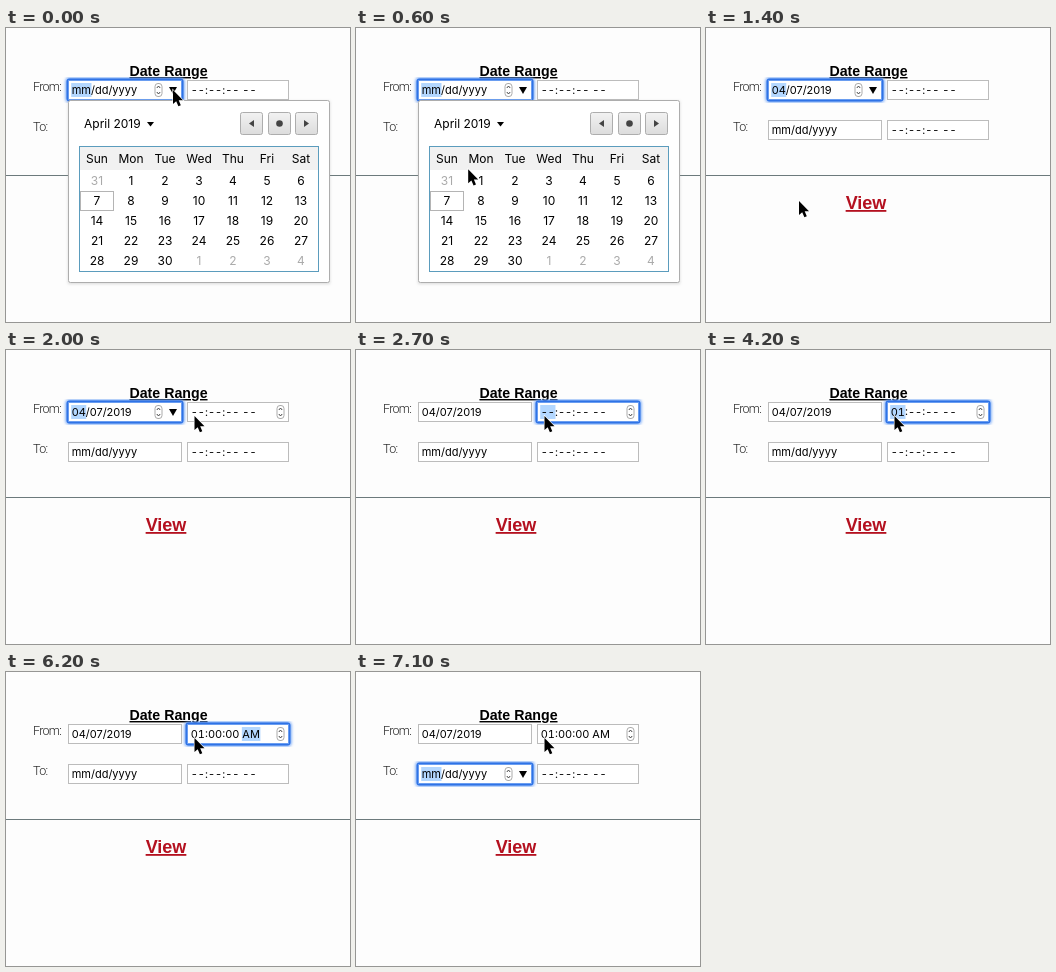
Recreate the animation shown at these times as an HTML page. Size 344x294 px, loop 8000 ms.

```html
<!DOCTYPE html>
<html lang="en">
<head>
<meta charset="utf-8">
<style>
html, body { margin: 0; width: 100%; height: 100%; overflow: hidden; background: #fdfdfd; }
svg { display: block; }
text { font: 11px Inter, "Liberation Sans", sans-serif; fill: #000; }
.title { font: bold 14.2px "Liberation Sans", Arial, sans-serif; text-decoration: underline; text-anchor: middle; }
.view { font: bold 18px "Liberation Sans", Arial, sans-serif; fill: #b4101f; text-decoration: underline; text-anchor: middle; }
.label { font: 300 12.5px Roboto, sans-serif; letter-spacing: -.7px; fill: #222; }
.time { font-variant-numeric: tabular-nums; }
.cal { font-size: 12px; }
.day { font-size: 12px; text-anchor: middle; }
.dim { fill: #aaa; }
</style>
</head>
<body>
<svg id="stage" width="344" height="294" viewBox="0 0 344 294">
  <defs>
    <linearGradient id="btn" x2="0" y2="1"><stop stop-color="#f2f2f2"/><stop offset="1" stop-color="#dcdcdc"/></linearGradient>
    <filter id="soft" x="-10%" y="-10%" width="120%" height="120%"><feGaussianBlur stdDeviation="1.5"/></filter>
  </defs>
  <path d="M0 147.5H344" stroke="#6c7a7c"/>
  <text class="title" x="162.5" y="48">Date Range</text>
  <text class="label" x="27" y="63">From:</text>
  <text class="label" x="27" y="103">To:</text>
  <text class="view" x="160" y="181">View</text>
  <g id="fields"></g>
  <g id="popup"></g>
  <path id="cursor" d="M0 0V14L3.2 11.2L5.4 16.2L7.8 15.2L5.7 10.3H10Z" stroke="#fff" stroke-width="1.2" paint-order="stroke"/>
</svg>
<script>
const $ = id => document.getElementById(id);
const LOOP = 8000, STEP = 100;

const rect = (x, y, w, h, fill, stroke = 'none', more = '') =>
  `<rect x="${x}" y="${y}" width="${w}" height="${h}" fill="${fill}" stroke="${stroke}" ${more}/>`;
const path = (d, fill = '#000', more = '') => `<path d="${d}" fill="${fill}" ${more}/>`;
const label = (x, y, s, cls) => `<text x="${x}" y="${y}" class="${cls}">${s}</text>`;

const spinner = (x, y) =>
  rect(x - 3.5, y - 6.5, 7, 13, '#fff', '#aaa', 'rx="3"') +
  path(`M${x - 1.7} ${y - 2}l1.7 -2l1.7 2M${x - 1.7} ${y + 2}l1.7 2l1.7 -2`, 'none', 'stroke="#444"');

// sel is the index of the selected two-character segment, or -1
function field({ x, y, w, s, sel = -1, cls = 'date', spin = false, drop = false }) {
  let out = '';
  if (sel >= 0) out +=
    rect(x - .5, y - .5, w + 1, 21, 'none', '#6ea3f5', 'stroke-width="4" rx="2" filter="url(#soft)"') +
    rect(x, y, w, 20, 'none', '#2f73e6', 'stroke-width="3" rx="1.5"');
  out += rect(x + .5, y + .5, w - 1, 19, '#fff', sel < 0 ? '#bcbcbc' : '#6a9df0');
  out += `<rect class="sel" y="${y + 3}" height="14" fill="#b3d7ff"/>`;
  out += `<text class="${cls}" x="${x + 3.7}" y="${y + 14}" data-sel="${sel}">${s}</text>`;
  if (spin) out += spinner(x + w - (drop ? 23.5 : 8.5), y + 10);
  if (drop) out += path(`M${x + w - 13} ${y + 7}h8l-4 7z`);
  return out;
}

function markSelection() {
  for (const text of $('fields').querySelectorAll('text')) {
    const i = +text.dataset.sel;
    if (i < 0) continue;
    const box = text.previousElementSibling;
    box.setAttribute('x', text.getStartPositionOfChar(i).x - .5);
    box.setAttribute('width', text.getSubStringLength(i, 2) + 1);
  }
}

function button(x, icon) {
  return rect(x + .5, 84.5, 22, 22, 'url(#btn)', '#adadad', 'rx="2"') + icon;
}

function popup(px, py) {
  const left = 74, top = 143, cw = 34, ch = 20;
  let out = rect(62, 73, 262, 183, '#999', 'none', 'opacity=".35" filter="url(#soft)"') +
    rect(62.5, 72.5, 261, 182, '#fff', '#adadad', 'rx="2"') +
    label(78, 100, 'April 2019', 'cal') + path('M141 94h7l-3.5 4.5z') +
    button(234, path('M248 92v7l-5 -3.5z', '#444')) +
    button(262, '<circle cx="273.5" cy="95.5" r="3.3" fill="#444"/>') +
    button(289, path('M298 92v7l5 -3.5z', '#444')) +
    rect(74, 119, 239, 23, '#f1f1f1');
  const col = Math.floor((px - left) / cw), row = Math.floor((py - top) / ch);
  if (col >= 0 && col < 7 && row >= 0 && row < 5)
    out += rect(left + col * cw, top + row * ch, cw, ch, '#dde4ef');
  out += rect(73.5, 118.5, 239, 125, 'none', '#5b9cbd');
  out += rect(74.5, 163.5, 33, 19, 'none', '#b4b4b4');
  'Sun Mon Tue Wed Thu Fri Sat'.split(' ').forEach((d, i) => out += label(91 + i * cw, 135, d, 'day'));
  for (let i = 0; i < 35; i++) {
    const n = i < 1 ? 31 : i > 30 ? i - 30 : i;
    out += label(91 + i % 7 * cw, 157 + Math.floor(i / 7) * ch, n, n === i ? 'day' : 'day dim');
  }
  return out;
}

// time, x, y of the pointer tip
const moves = [[0, 167, 62], [900, 93, 169], [1000, 93, 173], [1400, 93, 173], [2000, 188.5, 66]];
function pointer(t) {
  const i = moves.findIndex(m => m[0] > t);
  if (i < 0) return moves[moves.length - 1].slice(1);
  const [t0, x0, y0] = moves[i - 1], [t1, x1, y1] = moves[i];
  const p = (t - t0) / (t1 - t0), e = p * p * (3 - 2 * p);
  return [x0 + (x1 - x0) * e, y0 + (y1 - y0) * e];
}

function draw(t) {
  const [px, py] = pointer(t);
  const blank = 'mm/dd/yyyy', open = t < 1100;
  const part = (at, s) => t < at ? '--' : s;
  const clock = [part(4200, '01'), part(4800, '00'), part(5500, '00')].join(':') + ' ' + part(6200, 'AM');
  const onFrom = t < 2700, onTo = t >= 6800, onTime = !onFrom && !onTo;
  const unit = t < 4500 ? 0 : t < 5200 ? 3 : t < 5800 ? 6 : 9;
  const hover = !open && px > 181 && py < 73;

  $('fields').innerHTML =
    field({ x: 62, y: 52, w: 114, s: open ? blank : '04/07/2019', sel: onFrom ? 0 : -1, spin: onFrom, drop: onFrom }) +
    field({ x: 181, y: 52, w: 102, s: clock, cls: 'time', sel: onTime ? unit : -1, spin: onTime || hover }) +
    field({ x: 62, y: 92, w: 114, s: blank, sel: onTo ? 0 : -1, spin: onTo, drop: onTo }) +
    field({ x: 181, y: 92, w: 102, s: '--:--:-- --', cls: 'time' });
  markSelection();
  $('popup').innerHTML = open ? popup(px, py) : '';
  $('cursor').setAttribute('transform', `translate(${px} ${py})`);
}

let last = -1;
function tick() {
  const t = Math.floor(performance.now() % LOOP / STEP) * STEP;
  if (t !== last) draw(last = t);
  requestAnimationFrame(tick);
}
tick();
</script>
</body>
</html>
```
